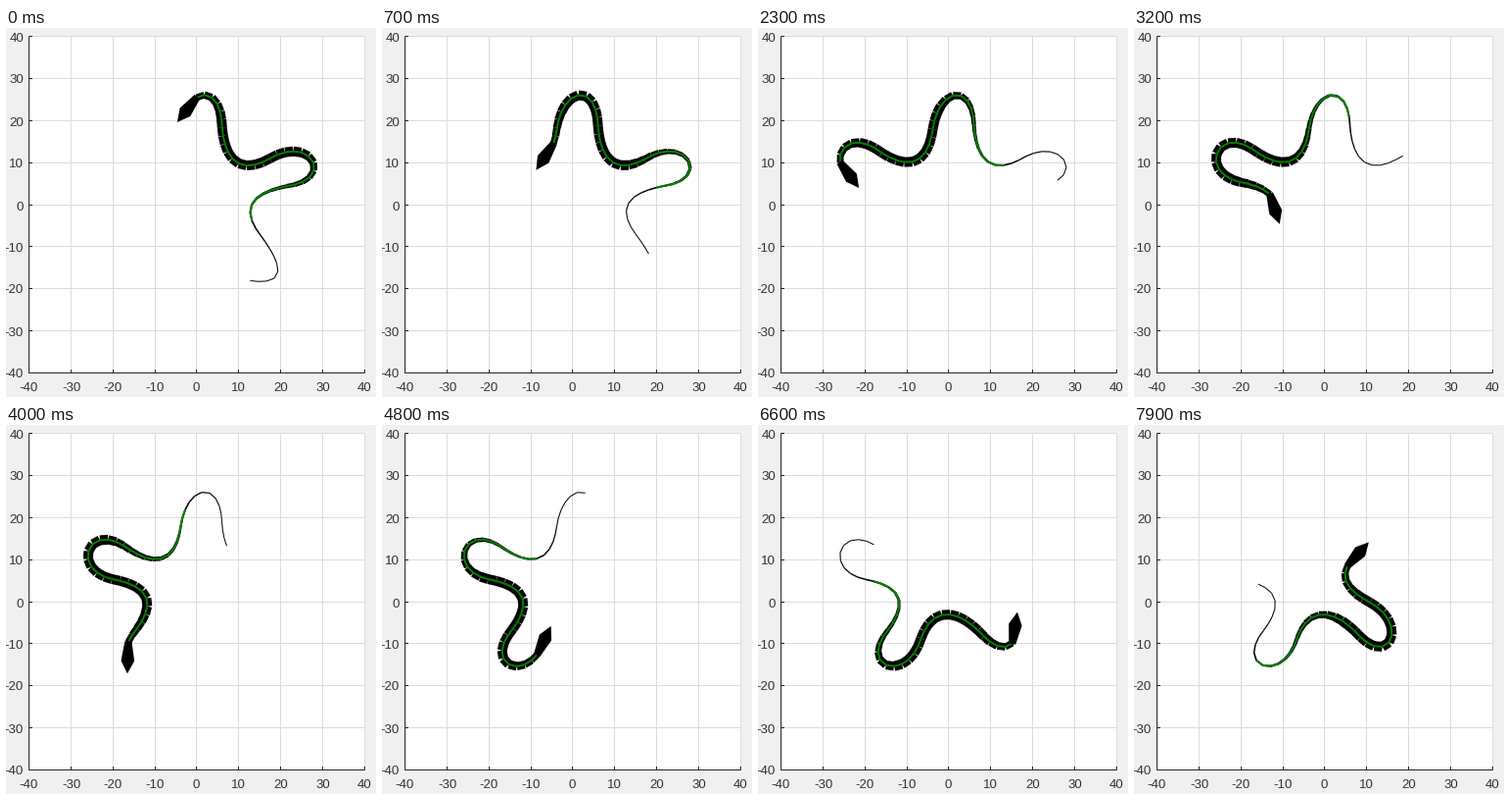
A matplotlib script that plays this animation: 378x376 px, repeating every 8000 ms.

```python
import numpy as np
import matplotlib.pyplot as plt
from matplotlib.animation import FuncAnimation
from matplotlib.collections import LineCollection
from matplotlib.patches import Polygon

W, H, DPI = 378, 376, 100
PX = 72 / DPI  # points per pixel
FRAMES, INTERVAL = 80, 100
SEGMENTS = 44
X0, Y0, X1, Y1 = 23, 8, 366, 351
INK = "#262626"

# Inflection points of the winding track: x, y, heading in degrees
BENDS = [
    (249, 257, -8), (259, 210, 127), (290, 160, 10), (270, 132, 210),
    (220, 97, 93), (178, 103, 262), (122, 124, 145), (110, 157, 349),
    (131, 210, 232), (165.5, 218.5, 432), (229, 213.5, 313),
    (240, 180, 512), (237, 124, 395),
]
FIRST_NECK, LAST_TAIL = (194, 70), (127, 160)


def bend(a, b):
    """Cubic arc between two inflections; sharper turns swing out further."""
    t = np.linspace(0, 1, 120, endpoint=False)[:, None]
    p, q = np.array(a[:2]), np.array(b[:2])
    reach = (70 + 0.35 * abs(b[2] - a[2])) / 3
    u, v = [np.array([np.cos(h), -np.sin(h)]) for h in np.radians([a[2], b[2]])]
    return ((1 - t) ** 3 * p + 3 * t * (1 - t) ** 2 * (p + reach * u)
            + 3 * t ** 2 * (1 - t) * (q - reach * v) + t ** 3 * q)


curve = np.vstack([bend(a, b) for a, b in zip(BENDS, BENDS[1:])])
arc = np.r_[0, np.cumsum(np.hypot(*np.diff(curve, axis=0).T))]


def at(s):
    return np.column_stack([np.interp(s, arc, c) for c in curve.T])


def locate(point):
    return arc[np.argmin(np.hypot(*(curve - point).T))]


LENGTH, TRAVEL = locate(FIRST_NECK), locate(LAST_TAIL)

fig = plt.figure(figsize=(W / DPI, H / DPI), dpi=DPI, facecolor="#f0f0f0")
ax = fig.add_axes([0, 0, 1, 1])
ax.set_xlim(-0.5, W - 0.5)
ax.set_ylim(H - 0.5, -0.5)
ax.axis("off")


def rule(xs, ys, color):
    ax.plot(xs, ys, color=color, lw=PX, solid_capstyle="butt", zorder=1, snap=False)


def draw_axes():
    ax.fill([X0, X1, X1, X0], [Y0, Y0, Y1, Y1], color="white", lw=0, zorder=0)
    font = dict(family="Liberation Sans", size=13.2 * PX, color="#333333")
    xs, ys = np.linspace(X0, X1, 9).round(), np.linspace(Y0, Y1, 9).round()
    for x, y in zip(xs, ys):
        rule([x, x], [Y0, Y1], "#dcdcdc")
        rule([X0, X1], [y, y], "#dcdcdc")
    for x, y, v in zip(xs, ys, range(-40, 50, 10)):
        rule([x, x], [Y1 - 3.5, Y1], INK)
        rule([X0, X0 + 3.5], [y, y], INK)
        ax.text(x, 369, f"{v}", ha="center", va="baseline", **font)
        ax.text(17.5, y + 5, f"{-v}", ha="right", va="baseline", **font)
    rule([X0, X0], [Y0, Y1 + 0.5], INK)
    rule([X0 - 0.5, X1], [Y1, Y1], INK)


draw_axes()

# Thickness swells from the tail and narrows a little at the neck
u = (np.arange(SEGMENTS) + 0.5) / SEGMENTS
body_w = 1 + 9 * np.clip(u / 0.575, 0, 1) ** 3 - 3.5 * np.clip(u * 9 - 8, 0, 1)
bare = SEGMENTS // 4

body = LineCollection([], colors="black", linewidths=body_w * PX,
                      capstyle="butt", zorder=3)
stripe = LineCollection([], colors="#008000", linewidths=2 * PX,
                        capstyle="butt", zorder=4)
head = Polygon(np.zeros((5, 2)), closed=True, facecolor="black", lw=0, zorder=5)
ax.add_collection(body)
ax.add_collection(stripe)
ax.add_patch(head)

# Head outline as (forward, sideways) from the neck
HEAD = np.array([(-1, -3.5), (19, -6.8), (32, 0), (19, 6.8), (-1, 3.5)])


def update(i):
    t = i / (FRAMES - 1)
    tail = TRAVEL * t - 5 * np.sin(np.pi * t * t)
    neck = tail + LENGTH
    joints = at(np.linspace(tail, neck, SEGMENTS + 1))
    links = np.stack([joints[:-1], joints[1:]], axis=1)
    body.set_segments(links)
    stripe.set_segments(links[bare:])
    ahead = at([neck + 18])[0] - joints[-1]
    ahead /= np.hypot(*ahead)
    side = np.array([-ahead[1], ahead[0]])
    head.set_xy(joints[-1] + HEAD @ np.array([ahead, side]))
    return body, stripe, head


anim = FuncAnimation(fig, update, frames=FRAMES, interval=INTERVAL,
                     repeat=True, repeat_delay=0, blit=False)
plt.show()
```
